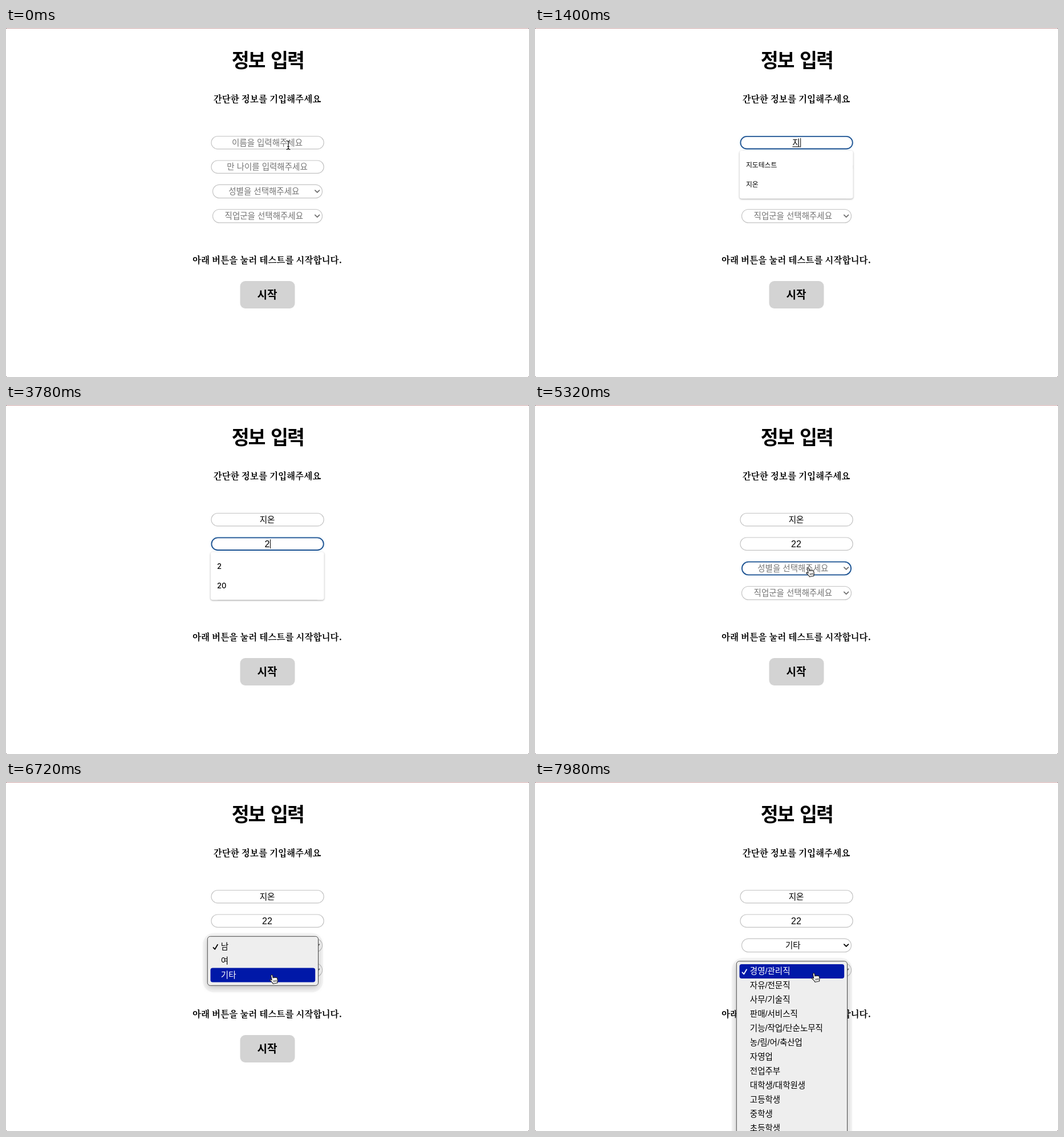
An HTML page with a canvas that plays this animation: 917 px wide and 611 px high, repeating every 8 s.

```html
<!DOCTYPE html>
<html lang="ko">
<head>
<meta charset="utf-8">
<title>정보 입력</title>
<style>
  html, body { margin: 0; width: 100%; height: 100%; overflow: hidden; background: #fff; }
  canvas { display: block; }
</style>
</head>
<body>
<canvas id="stage" width="917" height="611"></canvas>
<script>
const ctx = document.getElementById('stage').getContext('2d');
const LOOP = 8000, STEP = 70, CENTER = 458.5;
const FORM = '"Liberation Sans", "Noto Sans CJK KR", "Noto Sans CJK", sans-serif';
const SANS = '"Noto Sans CJK KR", "Noto Sans CJK", sans-serif';
const SERIF = '"Noto Serif CJK KR", "Noto Sans CJK KR", serif';
const LIST = 'Inter, "Noto Sans CJK KR", sans-serif';
const GRAY = '#757575';

// Steps are [start time, value]; the latest one reached applies.
const NAME = [[0, ''], [1330, 'ㅈ'], [1400, '지'], [1540, '징'], [1680, '지오'], [1820, '지온']];
const AGE = [[0, ''], [3710, '2'], [3990, '22']];
const FOCUS = [[0, ''], [210, 'name'], [2450, 'age'], [4270, 'gender'], [5600, ''], [6930, 'gender'], [7630, '']];
const CARET = [[0, 0], [210, 1], [700, 0], [1260, 1], [2940, 0], [3500, 1], [4270, 0]];
const MENU = [[0, ''], [5600, 'gender'], [6930, ''], [7630, 'job']];
const NAME_LIST = [
  [0, []],
  [280, ['지도테스트', '지온', '테스트', '사용자', '이름', '가나다']],
  [1330, []], [1400, ['지도테스트', '지온']], [1540, []]
];
const AGE_LIST = [[0, []], [3780, ['2', '20']], [3990, []]];

const GENDERS = ['남', '여', '기타'];
const JOBS = ['경영/관리직', '자유/전문직', '사무/기술직', '판매/서비스직', '기능/작업/단순노무직',
  '농/림/어/축산업', '자영업', '전업주부', '대학생/대학원생', '고등학생', '중학생', '초등학생'];

// Pointer path: [time, x, y]
const POINTER = [
  [0, 495, 205], [280, 460, 209], [4900, 460, 209], [5040, 464, 224], [5320, 482, 292.5],
  [5460, 484, 296], [5530, 484, 296], [6020, 510, 308.3], [6230, 504, 316], [6300, 504, 316],
  [6720, 469, 345], [6930, 472, 344], [7140, 473, 332], [7490, 502, 343], [7560, 502, 343],
  [7770, 504, 344], [7840, 504, 344], [7980, 491.7, 342]
];

const HAND = new Path2D('M-3.2 1.2V-6.4a1.4 1.4 0 0 1 2.8 0V-2c.3-1 2.4-.9 2.6.2 .4-.8 2.3-.6 2.5.5 .5-.6 2-.3 2 1V3c0 2-1.3 3-1.3 5H-2.2C-2.5 5.5-5 3-6.2 1.2c-1-1.5 1-2.3 3 0Z');
const KNUCKLES = new Path2D('M-.2 2.2v3.4M2 2.2v3.4M4.2 2.2v3.4');
const ARROW = new Path2D('M-4-8V6l3.2-3L1.4 8l2.2-1L1.6 2.2H6Z');
const IBEAM = new Path2D('M-3.2-7.5C-1-7.5 0-7 0-5.5V5.5C0 7-1 7.5-3.2 7.5M3.2-7.5C1-7.5 0-7 0-5.5M0 5.5C0 7 1 7.5 3.2 7.5M-1.5 2.5h3');
const CHEVRON = new Path2D('M541.9 -1.9L545.7 1.9L549.5 -1.9');
const CHECK = new Path2D('M363.5 1.5L366.3 4.5L371 -3.5');

function at(t, steps) {
  let value;
  for (const [start, v] of steps) if (t >= start) value = v;
  return value;
}

function pointerAt(t) {
  const i = POINTER.findIndex(p => p[0] > t);
  if (i < 0) return POINTER.at(-1).slice(1);
  const [t0, x0, y0] = POINTER[i - 1], [t1, x1, y1] = POINTER[i];
  const k = (t - t0) / (t1 - t0);
  return [x0 + (x1 - x0) * k, y0 + (y1 - y0) * k];
}

// Text placed by the vertical middle of its glyphs; returns its width.
function text(str, x, middle, font, size, { color = '#000', align = 'center', weight = 400 } = {}) {
  ctx.font = `${weight} ${size}px ${font}`;
  ctx.textAlign = align;
  ctx.fillStyle = color;
  ctx.fillText(str, x, middle + size * 0.38);
  return ctx.measureText(str).width;
}

function box(x, y, w, h, r, fill, stroke, line = 1) {
  ctx.beginPath();
  ctx.roundRect(x, y, w, h, r);
  if (fill) { ctx.fillStyle = fill; ctx.fill(); }
  if (stroke) { ctx.strokeStyle = stroke; ctx.lineWidth = line; ctx.stroke(); }
}

function shadowed(color, blur, dy, draw) {
  ctx.save();
  Object.assign(ctx, { shadowColor: color, shadowBlur: blur, shadowOffsetY: dy });
  draw();
  ctx.restore();
}

function strokeAt(path, x, y, color, width) {
  ctx.save();
  ctx.translate(x, y);
  ctx.strokeStyle = color;
  ctx.lineWidth = width;
  ctx.lineCap = ctx.lineJoin = 'round';
  ctx.stroke(path);
  ctx.restore();
}

function frame(x, y, w, h, focused) {
  if (!focused) return box(x, y, w, h, h / 2, '#fff', '#c4c4c4', 1.2);
  shadowed('rgba(120,200,235,.4)', 4, 0, () => box(x, y, w, h, h / 2, '#fff'));
  box(x + 0.4, y + 0.4, w - 0.8, h - 0.8, h / 2, null, '#1c5191', 1.8);
}

function input(y, value, hint, focused, caret, composing) {
  frame(360, y - 11.2, 197.2, 22.4, focused);
  const digits = /\d/.test(value);
  const width = text(value || hint, CENTER - 0.5, y - 0.5, FORM, digits ? 16 : 14.5, { color: value ? '#000' : GRAY });
  const half = value ? width / 2 : 0;
  ctx.fillStyle = '#000';
  if (composing) ctx.fillRect(CENTER - 0.5 - half, y + 6.6, width, 1);
  if (focused && caret) ctx.fillRect(CENTER + half, y - 8, 1, 16);
}

function select(y, value, hint, focused) {
  frame(362.5, y - 11.7, 192, 23.4, focused);
  text(value || hint, 452.3, y - 0.3, FORM, 14.5, { color: value ? '#000' : GRAY });
  strokeAt(CHEVRON, 0, y, value ? '#000' : '#707070', 1.8);
}

function suggestions(fieldY, items) {
  if (!items.length) return;
  shadowed('rgba(0,0,0,.35)', 3, 1, () => box(358.7, fieldY + 14, 199, 15 + 34.5 * items.length, 4, '#fff'));
  items.forEach((item, i) => {
    const digits = /\d/.test(item);
    text(item, 370, fieldY + 38.4 + 34.5 * i, LIST, digits ? 13 : 11.8, { align: 'left', weight: 500 });
  });
}

function menu(top, items, active) {
  const h = 11 + 25 * items.length;
  box(345, top - 6, 211, h + 18, 20, 'rgba(0,0,0,.04)');
  shadowed('rgba(0,0,0,.22)', 11, 4, () => box(353.3, top, 194.2, h, 5, '#eee'));
  box(353.3, top, 194.2, h, 5, '#eee', '#4c4c4c', 1);
  items.forEach((item, i) => {
    const y = top + 17.3 + 25 * i, color = i === active ? '#fff' : '#000';
    if (i === active) box(358.5, y - 12, 183.7, 25, 4, '#0018a8');
    text(item, 376.8, y - 0.3, FORM, 14.5, { color, align: 'left' });
    if (i === 0) strokeAt(CHECK, 0, y + 0.7, color, 1.8);
  });
}

function pointer(x, y) {
  const overInput = y < 213 || (y >= 232 && y < 255);
  if (overInput) {
    strokeAt(IBEAM, x, y, '#fff', 2.6);
    strokeAt(IBEAM, x, y, '#000', 1.2);
    return;
  }
  const hand = y >= 278, path = hand ? HAND : ARROW;
  ctx.save();
  ctx.translate(x, y);
  if (hand) ctx.rotate(-0.2);
  ctx.lineJoin = 'round';
  ctx.strokeStyle = hand ? '#222' : '#fff';
  ctx.fillStyle = hand ? '#fff' : '#000';
  ctx.lineWidth = 1.2;
  ctx.fill(path);
  ctx.stroke(path);
  if (hand) { ctx.lineWidth = 0.9; ctx.stroke(KNUCKLES); }
  ctx.restore();
}

function page() {
  ctx.fillStyle = '#fff';
  ctx.fillRect(0, 0, 917, 611);
  ctx.fillStyle = '#cda3a3';
  ctx.fillRect(0, 0, 917, 1);
  ctx.fillStyle = '#5c4650';
  for (const x of [0, 916]) for (const y of [0, 610]) ctx.fillRect(x, y, 1, 1);

  ctx.letterSpacing = '-2px';
  ctx.wordSpacing = '5px';
  text('정보 입력', CENTER + 0.3, 56.5, SANS, 33.6, { weight: 900 });
  ctx.letterSpacing = ctx.wordSpacing = '0px';
  text('간단한 정보를 기입해주세요', CENTER - 0.5, 124, SERIF, 15.6, { weight: 600 });
  text('아래 버튼을 눌러 테스트를 시작합니다.', CENTER - 0.5, 406.5, SERIF, 15.6, { weight: 600 });
  box(410.5, 443, 96, 48, 9, '#d3d3d3');
  text('시작', CENTER - 0.5, 466.5, SANS, 19, { weight: 700 });
}

function render(t) {
  const focus = at(t, FOCUS), caret = at(t, CARET), open = at(t, MENU);
  const name = at(t, NAME), [x, y] = pointerAt(t);

  page();
  input(200.7, name, '이름을 입력해주세요', focus === 'name', caret, name && t < 2380);
  input(243.2, at(t, AGE), '만 나이를 입력해주세요', focus === 'age', caret);
  select(286, t >= 6930 ? '기타' : '', '성별을 선택해주세요', focus === 'gender');
  select(329.2, '', '직업군을 선택해주세요', false);
  suggestions(200.7, at(t, NAME_LIST));
  suggestions(243.2, at(t, AGE_LIST));

  const rowUnder = top => Math.floor((y - 8 - top - 5.7) / 25);
  if (open === 'gender') menu(270.3, GENDERS, rowUnder(270.3));
  if (open === 'job') menu(313.8, JOBS, rowUnder(313.8));
  if (t < 1330 || t >= 4970) pointer(x, y);
}

const begin = performance.now();
function tick() {
  const t = (performance.now() - begin) % LOOP;
  render(Math.floor(t / STEP) * STEP);
  requestAnimationFrame(tick);
}
tick();
</script>
</body>
</html>
```
